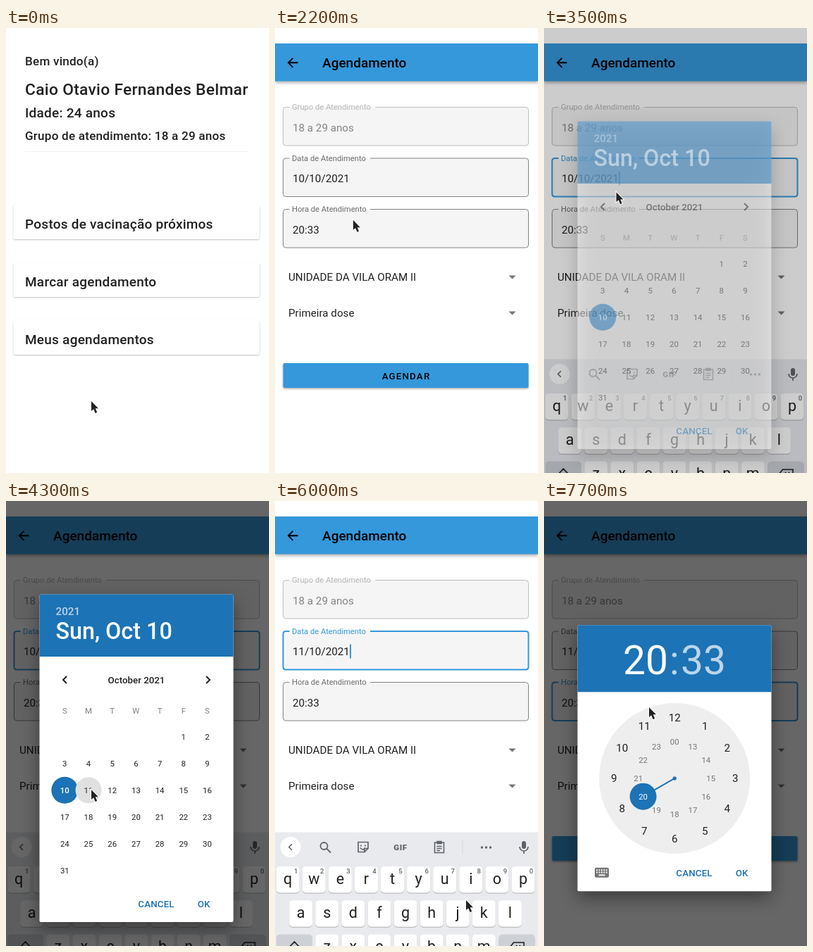
An HTML page with a canvas for the animation above (8 s loop, 373 by 632 pixels).

```html
<!DOCTYPE html>
<html lang="pt">
<head>
<meta charset="utf-8">
<title>Agendamento</title>
<style>
html, body { margin: 0; width: 100%; height: 100%; overflow: hidden; background: #fff }
canvas { display: block; width: 373px; height: 632px }
</style>
</head>
<body>
<canvas id="stage"></canvas>
<script>
const W = 373, H = 632, LOOP = 8000, STEP = 100;
const BLUE = '#3498db', DEEP = '#1c73b5', INK = '#212121', GREY = '#757575';
const canvas = document.getElementById('stage');
const dpr = window.devicePixelRatio || 1;
canvas.width = W * dpr;
canvas.height = H * dpr;
const c = canvas.getContext('2d');

// Linear interpolation over [time, value] pairs
function track(t, keys, ease = p => p) {
  if (t <= keys[0][0]) return keys[0][1];
  for (let i = 1; i < keys.length; i++) {
    const [t0, a] = keys[i - 1], [t1, b] = keys[i];
    if (t <= t1) return a + (b - a) * ease((t - t0) / (t1 - t0));
  }
  return keys[keys.length - 1][1];
}
const smooth = p => p * p * (3 - 2 * p);

// Text whose capitals are centred vertically on y
function text(s, x, y, size, { color = INK, weight = 400, align = 'left', space = 0 } = {}) {
  c.font = `${weight} ${size}px Roboto, sans-serif`;
  c.letterSpacing = space * size + 'px';
  c.textAlign = align;
  c.fillStyle = color;
  c.fillText(s, x, y + size * 0.356);
}
const mid = (s, x, y, size, opts) => text(s, x, y, size, { ...opts, align: 'center' });

function box(x, y, w, h, r, color, blur = 0, drop = 0, shade = 0) {
  c.save();
  if (shade) {
    c.shadowColor = `rgba(0,0,0,${shade})`;
    c.shadowBlur = blur * dpr;
    c.shadowOffsetY = drop * dpr;
  }
  c.fillStyle = color;
  c.beginPath();
  c.roundRect(x, y, w, h, r);
  c.fill();
  c.restore();
}

function disc(x, y, r, color) {
  c.fillStyle = color;
  c.beginPath();
  c.arc(x, y, r, 0, 7);
  c.fill();
}

function line(d, x, y, color, width) {
  c.save();
  c.translate(x, y);
  c.strokeStyle = color;
  c.lineWidth = width;
  c.stroke(new Path2D(d));
  c.restore();
}

function shape(d, x, y, color) {
  c.save();
  c.translate(x, y);
  c.fillStyle = color;
  c.fill(new Path2D(d));
  c.restore();
}

function home(t) {
  box(0, 0, W, H, 0, '#fff');
  const row = (s, y, size) => text(s, 27, y, size, { weight: 500, space: 0.0125 });
  row('Bem vindo(a)', 47, 17.1);
  row('Caio Otavio Fernandes Belmar', 87, 22.8);
  row('Idade: 24 anos', 120.5, 19);
  row('Grupo de atendimento: 18 a 29 anos', 153, 17.1);
  box(27, 175, 318, 1, 0, '#f3f3f3');
  ['Postos de vacinação próximos', 'Marcar agendamento', 'Meus agendamentos'].forEach((s, i) => {
    const y = 251 + 82 * i;
    if (i === 1 && t >= 1000) box(10.5, y, 349, 49, 2, '#fff', 7, 3, 0.32);
    else box(10.5, y, 349, 49, 2, '#fff', 2, 1, 0.25);
    row(s, y + 27, 19);
  });
}

function field(y, label, gapEnd, value, state, caretX) {
  const b = y + 54.5, l = 11.5, r = 359.5, k = 4;
  const focus = state === 'focus', off = state === 'off';
  box(l, y, r - l, 54.5, k, '#f5f5f5');
  line(`M${gapEnd} ${y}H${r - k}Q${r} ${y} ${r} ${y + k}V${b - k}Q${r} ${b} ${r - k} ${b}` +
    `H${l + k}Q${l} ${b} ${l} ${b - k}V${y + k}Q${l} ${y} ${l + k} ${y}H20.5`,
    0, 0, focus ? BLUE : off ? '#bdbdbd' : '#828282', focus ? 2 : 1);
  text(label, 24, y, 11.2, { color: focus ? BLUE : off ? '#b4b4b4' : '#6c6c6c' });
  text(value, 25, y + 29, 15.2, { color: off ? '#858585' : INK });
  if (caretX) box(caretX, y + 18.5, 2, 20, 0, BLUE);
}

function spinner(s, y) {
  text(s, 19, y, 15.2);
  shape('M-5 -2.5H5L0 2.5Z', 336.5, y, GREY);
}

function form(t) {
  box(0, 0, W, H, 0, '#fff');
  box(0, 22, W, 53.5, 0, BLUE, 4, 2, 0.3);
  line('M7.5 0H-6M0.5 -6.6L-6.1 0L0.5 6.6', 25, 49.3, '#000', 1.9);
  text('Agendamento', 67, 49.5, 19, { weight: 500, color: '#000' });

  const dateCaret = t >= 3100 && t < 7100;
  field(112.5, 'Grupo de Atendimento', 142.5, '18 a 29 anos', 'off');
  field(185, 'Data de Atendimento', 135, t < 4500 + 1200 ? '10/10/2021' : '11/10/2021',
    t >= 3300 && t < 7100 ? 'focus' : '', dateCaret && 106);
  field(257.5, 'Hora de Atendimento', 135, '20:33', t >= 7400 ? 'focus' : '', t >= 7200 && 63);

  const loaded = t >= 1800;
  spinner(loaded ? 'UNIDADE DA VILA ORAM II' : '', loaded ? 354 : 367);
  spinner('Primeira dose', loaded ? 405 : 432.5);
  if (t < 3300 || t >= 7500) {
    const y = loaded ? 476 : 503;
    box(11.5, y, 348, 35, 2, BLUE, 3, 1.5, 0.35);
    mid('AGENDAR', 186, y + 18, 13.3, { weight: 500, space: 0.089, color: '#000' });
  }
}

function key(x, y, w, color = '#fff') {
  box(x - w / 2, y, w, 37.5, 5, color, 0.5, 1, 0.25);
}

function keyboard(t) {
  const icon = '#5f6368';
  c.save();
  c.translate(0, 162 * (1 - track(t, [[3255, 0], [3505, 1]], p => 1 - (1 - p) ** 3)));
  box(0, 470.5, W, 170, 0, '#e8eaed');

  disc(22, 491.5, 14.5, '#fff');
  line('M2 -4.2L-2.2 0L2 4.2', 22, 491.5, icon, 1.6);
  line('M3 -1.5A5 5 0 1 1 -7 -1.5A5 5 0 1 1 3 -1.5M1.6 2L7.5 8', 71.5, 491.5, icon, 1.8);
  line('M-7 -7H7V2L2 7H-7ZM7 2H2V7M-4 1Q0 6 3 1M-3 -3V-1M3 -3V-1', 125, 491.5, icon, 1.7);
  mid('GIF', 178, 492, 11.5, { weight: 900, color: icon, space: 0.06 });
  line('M-6.5 -6.5H6.5V8H-6.5ZM-3 -8H3V-5H-3ZM-3.5 -1H3.5M-3.5 2H3.5M-3.5 5H1', 233, 491.5, icon, 1.6);
  box(265.5, 482, 1, 20, 0, '#d5d7da');
  for (const x of [293.5, 299.5, 305.5]) disc(x, 492, 1.7, icon);
  box(350, 483, 6, 11, 3, icon);
  line('M-6 -1A6 6 0 0 0 6 -1M0 5V9', 353, 492, icon, 1.7);

  const letters = (row, x0, y) => [...row].forEach((ch, i) => {
    const x = x0 + 37.08 * i;
    key(x, y, 33);
    mid(ch, x, y + 17, 21.5);
    if (row.length === 10) mid((i + 1) % 10, x + 11.5, y + 7, 9.5, { color: icon, weight: 500 });
  });
  letters('qwertyuiop', 18.2, 519);
  letters('asdfghjkl', 36.7, 567.2);
  letters('zxcvbnm', 73.8, 615.5);
  key(27.5, 615.5, 51, '#cdd0d5');
  key(343, 615.5, 51, '#cdd0d5');
  line('M0 -8L8.5 1H4V8H-4V1H-8.5Z', 27.5, 634, INK, 1.7);
  line('M-10 0L-4.5 -7H10V7H-4.5ZM-1 -3L5 3M5 -3L-1 3', 343, 634, INK, 1.6);
  c.restore();
}

function dialog(top, height, head) {
  box(47.5, top, 275, height, 2, '#fff', 24, 9, 0.42);
  box(47.5, top, 275, head, [2, 2, 0, 0], DEEP);
  const y = top + height - 26;
  mid('CANCEL', 213, y, 13.3, { weight: 500, color: DEEP, space: 0.012 });
  mid('OK', 280.5, y, 13.3, { weight: 500, color: DEEP });
}

function datePicker(t) {
  const day = t < 4500 ? 10 : 11;
  dialog(132.5, 465.5, 88.5);
  text('2021', 70.5, 157, 15.2, { weight: 500, color: 'rgba(255,255,255,.7)' });
  text(day === 10 ? 'Sun, Oct 10' : 'Mon, Oct 11', 70.5, 185, 32.3, { weight: 500, color: '#fff' });
  mid('October 2021', 185, 254, 13.3, { weight: 500 });
  line('M2.5 -5L-2.5 0L2.5 5', 83.5, 254, INK, 2);
  line('M-2.5 -5L2.5 0L-2.5 5', 286.5, 254, INK, 2);

  const colX = i => 83.3 + 33.7 * i;
  [...'SMTWTFS'].forEach((s, i) => mid(s, colX(i), 298, 11.4, { color: '#808080' }));
  for (let d = 1; d <= 31; d++) {
    const x = colX((d + 4) % 7), y = 334.5 + 38.15 * Math.floor((d + 4) / 7);
    if (d === day) disc(x, y, 19, DEEP);
    else if (d === 11 && t >= 4300) disc(x, y, 18.5, '#e0e0e0');
    mid(d, x, y, 11.4, { color: d === day ? '#fff' : INK, weight: d === day ? 500 : 400 });
  }
}

function timePicker(t) {
  const top = track(t, [[7400, 100], [7600, 176.3]]);
  const cx = 185.2, cy = top + 217.6;
  const pale = 'rgba(255,255,255,.7)';
  dialog(top, 378, 95);
  mid('20', 144, top + 49, 56.9, { color: '#fff' });
  mid(':', 185, top + 49, 56.9, { color: pale });
  mid('33', 226, top + 49, 56.9, { color: pale });

  disc(cx, cy, 107, '#eee');
  for (let h = 0; h < 12; h++) {
    const a = h * Math.PI / 6, sx = Math.sin(a), sy = -Math.cos(a);
    const x = cx + 51.5 * sx, y = cy + 51.5 * sy;
    mid(h || 12, cx + 86 * sx, cy + 86 * sy, 15.2);
    if (h === 8) {
      line(`M0 0L${x - cx} ${y - cy}`, cx, cy, DEEP, 2);
      disc(x, y, 19, DEEP);
    }
    mid(h ? h + 12 : '00', x, y, 11.4, { color: h === 8 ? '#fff' : GREY });
  }
  disc(cx, cy, 2.6, DEEP);

  const ky = top + 344.5;
  box(72, ky, 20, 14, 2, GREY);
  for (let i = 0; i < 5; i++)
    for (let j = 0; j < 2; j++) box(74.2 + 3.4 * i, ky + 2.5 + 3.2 * j, 1.9, 1.9, 0, '#fff');
  box(77.5, ky + 9.6, 9, 1.9, 0, '#fff');
}

function pointer(t) {
  const at = i => track(t, [
    [0, 121, 530], [500, 129, 372], [1900, 129, 372], [2400, 101, 219], [3400, 101, 219],
    [4000, 121, 410], [4600, 121, 410], [5200, 274, 572], [5300, 271, 567],
    [6000, 271, 567], [6700, 149, 293]
  ].map(k => [k[0], k[i]]), smooth);
  const arrow = 'M0 0V14L3.2 11.2L5.6 17L8.2 15.9L5.8 10.3H10Z';
  line(arrow, at(1), at(2), '#fff', 2);
  shape(arrow, at(1), at(2), '#222');
}

function draw(t) {
  c.setTransform(dpr, 0, 0, dpr, 0, 0);
  c.globalAlpha = 1;
  if (t < 1400) home(t);
  if (t >= 1300) {
    // The new screen grows into place
    const s = 1 - 0.06 * Math.max(0, 1 - (t - 1300) / 300) ** 5;
    if (t >= 1400) box(0, 0, W, H, 0, '#fff');
    c.save();
    c.globalAlpha = t < 1400 ? 0.5 : 1;
    c.translate(W / 2, H / 2);
    c.scale(s, s);
    c.translate(-W / 2, -H / 2);
    form(t);
    c.restore();
  }
  if (t >= 3300 && t < 7400) keyboard(t);

  const dim = track(t, [[3400, 0], [3700, 0.6], [5600, 0.6], [5700, 0.3], [5800, 0.05],
    [5900, 0.05], [6000, 0], [7300, 0], [7400, 0.2], [7600, 0.6]]);
  box(0, 0, W, H, 0, `rgba(0,0,0,${dim})`);

  c.globalAlpha = track(t, [[3400, 0], [3600, 1], [5600, 1], [5700, 0.5], [5800, 0]]);
  if (c.globalAlpha) datePicker(t);
  c.globalAlpha = 1;
  if (t >= 7400) timePicker(t);
  pointer(t);
}

function tick() {
  draw(Math.floor(performance.now() % LOOP / STEP) * STEP);
  requestAnimationFrame(tick);
}
tick();
</script>
</body>
</html>
```
